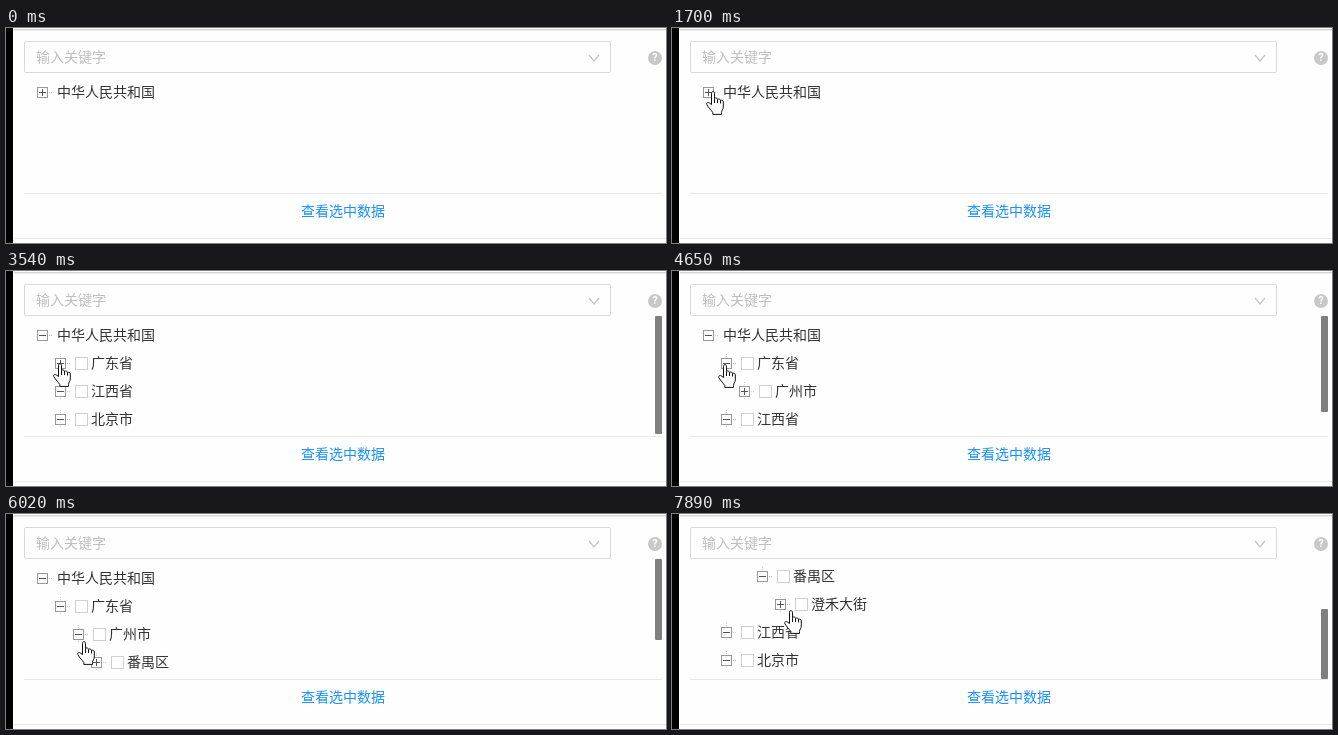
These frames come from a looping animation (660 by 215 pixels, 8 s). An HTML page:

```html
<!DOCTYPE html>
<html lang="zh-CN">
<head>
<meta charset="utf-8">
<title>地区选择树</title>
<style>
  * { box-sizing: border-box; }
  html, body { margin: 0; width: 100%; height: 100%; overflow: hidden; background: #fefefe; }
  .stage {
    position: relative; width: 660px; height: 215px; overflow: hidden;
    font: 14px/26px "Noto Sans CJK SC", "Noto Sans CJK", sans-serif; color: #333;
  }
  .stage > * { position: absolute; }

  /* every moving part shares one clock */
  .cursor, .arrow, .hand, .tree, .thumb, .kids, .plus::after {
    animation: 8s step-end -4ms infinite;
  }

  .edge { left: 0; top: 0; width: 7px; height: 215px; background: #000; }
  .line { height: 1px; background: #e8e8e8; }
  .select {
    left: 18px; top: 13px; width: 587px; height: 32px; padding-left: 11px;
    border: 1px solid #d9d9d9; border-radius: 2px; line-height: 28px; color: #bfbfbf;
  }
  .select svg { position: absolute; left: 563px; top: 12px; }
  .help {
    left: 642px; top: 23px; width: 14px; height: 14px; border-radius: 50%;
    background: #c8c8c8; color: #fff; text-align: center;
    font: bold 11px/14px Roboto, sans-serif;
  }
  .link { left: 295px; top: 169px; color: #1890ff; }

  .view { left: 8px; top: 45px; width: 641px; height: 120px; overflow: hidden; }
  .tree { padding: 5px 0 5px 23px; animation-name: scroll; }
  .row { position: relative; height: 28px; padding-left: 36px; white-space: nowrap; }
  .root { padding-left: 20px; }
  .kids { padding-left: 18px; overflow: hidden; }
  .k1 { animation-name: open1; }
  .k2 { animation-name: open2; }
  .k3 { animation-name: open3; }
  .k4 { animation-name: open4; }

  .sw { position: absolute; left: 0; top: 9px; width: 11px; height: 11px; border: 1px solid #999; }
  .sw::before, .sw::after { content: ""; position: absolute; background: #555; }
  .sw::before { left: 1px; top: 4px; width: 7px; height: 1px; }
  .plus::after { left: 4px; top: 1px; width: 1px; height: 7px; }
  .dots { position: absolute; background: #ccc; width: 1px; height: 1px; left: 12px; top: 14px; box-shadow: 2px 0 #ccc; }
  .row:not(.root) .dots { box-shadow: 2px 0 #ccc, -7px -7px #ccc, -7px -9px #ccc, -7px 7px #ccc; }
  .box { position: absolute; left: 20px; top: 8px; width: 13px; height: 13px; border: 1px solid #d0d0d0; background: #fff; }
  .s1::after { animation-name: shut1; }
  .s2::after { animation-name: shut2; }
  .s3::after { animation-name: shut3; }
  .s4::after { animation-name: shut4; }

  .thumb { left: 649px; top: 45px; width: 7px; border-radius: 1px; background: #7f7f7f; animation-name: thumb; }

  .cursor { left: 0; top: 0; width: 18px; height: 24px; animation-name: move; }
  .cursor svg { position: absolute; left: 0; top: 0; fill: #fff; stroke: #111; }
  .arrow { animation-name: arrow; }
  .hand { animation-name: hand; }

  @keyframes open1 { 0% { max-height: 0 } 28.25% { max-height: 40px } 29.75%, 100% { max-height: 200px } }
  @keyframes open2 { 0% { max-height: 0 } 51.25% { max-height: 14px } 52.75%, 100% { max-height: 200px } }
  @keyframes open3 { 0% { max-height: 0 } 69.5% { max-height: 14px } 71.375%, 100% { max-height: 200px } }
  @keyframes open4 { 0% { max-height: 0 } 83.625% { max-height: 14px } 85.125%, 100% { max-height: 200px } }

  @keyframes shut1 { 0% { opacity: 1 } 28.25%, 100% { opacity: 0 } }
  @keyframes shut2 { 0% { opacity: 1 } 51.25%, 100% { opacity: 0 } }
  @keyframes shut3 { 0% { opacity: 1 } 69.5%, 100% { opacity: 0 } }
  @keyframes shut4 { 0% { opacity: 1 } 83.625%, 100% { opacity: 0 } }

  @keyframes scroll {
    0% { transform: translateY(0) }
    92.25% { transform: translateY(-25px) }
    94.125%, 100% { transform: translateY(-86px) }
  }
  @keyframes thumb {
    0% { height: 0; top: 45px }
    29.75% { height: 118px; top: 45px }
    51.25% { height: 106px; top: 45px }
    52.75% { height: 96px; top: 45px }
    69.5% { height: 88px; top: 45px }
    71.375% { height: 81px; top: 45px }
    83.625% { height: 75px; top: 45px }
    85.125% { height: 70px; top: 45px }
    92.25% { height: 70px; top: 60px }
    94.125%, 100% { height: 70px; top: 95px }
  }
  @keyframes move {
    0%, 6.25% { transform: translate(549px, 190px) }
    7.75% { transform: translate(328px, 170px) }
    9.625% { transform: translate(229px, 158px) }
    11.5% { transform: translate(168px, 138px) }
    13% { transform: translate(118px, 119px) }
    14.5% { transform: translate(88px, 107px) }
    16.375% { transform: translate(58px, 93px) }
    17.875% { transform: translate(43px, 82px) }
    19.75% { transform: translate(36px, 69px) }
    21.25% { transform: translate(34px, 63px) }
    35.125% { transform: translate(40px, 71px) }
    36.625% { transform: translate(54px, 84px) }
    38.125% { transform: translate(66px, 93px) }
    39.625% { transform: translate(60px, 93px) }
    41.125% { transform: translate(53px, 92px) }
    44.25% { transform: translate(47px, 92px) }
    58.125% { transform: translate(46px, 93px) }
    59.625% { transform: translate(53px, 104px) }
    61.5% { transform: translate(57px, 108px) }
    63% { transform: translate(63px, 113px) }
    64.5% { transform: translate(67px, 116px) }
    75.25% { transform: translate(71px, 127px) }
    76.75% { transform: translate(76px, 135px) }
    78.25% { transform: translate(80px, 142px) }
    80.125% { transform: translate(82px, 148px) }
    85.125% { transform: translate(130px, 149px) }
    87% { transform: translate(150px, 145px) }
    88.875% { transform: translate(193px, 128px) }
    90.375% { transform: translate(229px, 114px) }
    95.625% { transform: translate(190px, 108px) }
    97.125% { transform: translate(138px, 101px) }
    98.625%, 100% { transform: translate(112px, 96px) }
  }
  @keyframes arrow {
    0% { opacity: 0 } 6.25% { opacity: 1 } 19.75% { opacity: 0 }
    59.625% { opacity: 1 } 63% { opacity: 0 }
    88.875% { opacity: 1 } 97.125%, 100% { opacity: 0 }
  }
  @keyframes hand {
    0% { opacity: 0 } 19.75% { opacity: 1 } 59.625% { opacity: 0 }
    63% { opacity: 1 } 88.875% { opacity: 0 } 97.125%, 100% { opacity: 1 }
  }
</style>
</head>
<body>
<div class="stage">
  <div class="edge"></div>
  <div class="line" style="left:8px;top:1px;width:652px;height:2px;background:linear-gradient(#d4d4d4 50%, #ececec 50%)"></div>
  <div class="select">输入关键字
    <svg width="12" height="9" fill="none" stroke="#c4c4c4" stroke-width="1.2"><path d="M1 1L6 7L11 1"/></svg>
  </div>
  <div class="help">?</div>

  <div class="view">
    <div class="tree">
      <div class="row root"><i class="sw plus s1"></i><i class="dots"></i>中华人民共和国</div>
      <div class="kids k1">
        <div class="row"><i class="sw plus s2"></i><i class="dots"></i><i class="box"></i>广东省</div>
        <div class="kids k2">
          <div class="row"><i class="sw plus s3"></i><i class="dots"></i><i class="box"></i>广州市</div>
          <div class="kids k3">
            <div class="row"><i class="sw plus s4"></i><i class="dots"></i><i class="box"></i>番禺区</div>
            <div class="kids k4">
              <div class="row"><i class="sw plus"></i><i class="dots"></i><i class="box"></i>澄禾大街</div>
            </div>
          </div>
        </div>
        <div class="row"><i class="sw"></i><i class="dots"></i><i class="box"></i>江西省</div>
        <div class="row"><i class="sw"></i><i class="dots"></i><i class="box"></i>北京市</div>
      </div>
    </div>
  </div>
  <div class="thumb"></div>

  <div class="line" style="left:18px;top:165px;width:638px"></div>
  <div class="link">查看选中数据</div>
  <div class="line" style="left:8px;top:210px;width:652px"></div>

  <div class="cursor">
    <svg class="arrow" width="12" height="19"><path d="M.5 .8V16.3L4 13L6.5 18.4L8.8 17.4L6.4 12H11.3Z"/></svg>
    <svg class="hand" width="18" height="24">
      <path d="M5.5 13.5V2.3C5.5 .1 8.5 .1 8.5 2.3V7.5C9 6.5 11.5 6.7 11.5 8.5C12.3 7.6 14.5 8 14.5 9.5C15.5 8.8 17.3 9.3 17.3 11V16C17.3 18 15.5 19.5 15.5 21.5V23.4H6.8V21.5C5.5 19.5 2.8 17 .8 13.6C0 11.5 2.5 10.8 3.8 12.3Z"/>
      <path d="M8.5 7.5V12M11.5 8.5V12M14.5 9.5V12.5" fill="none"/>
    </svg>
  </div>
</div>
</body>
</html>
```
